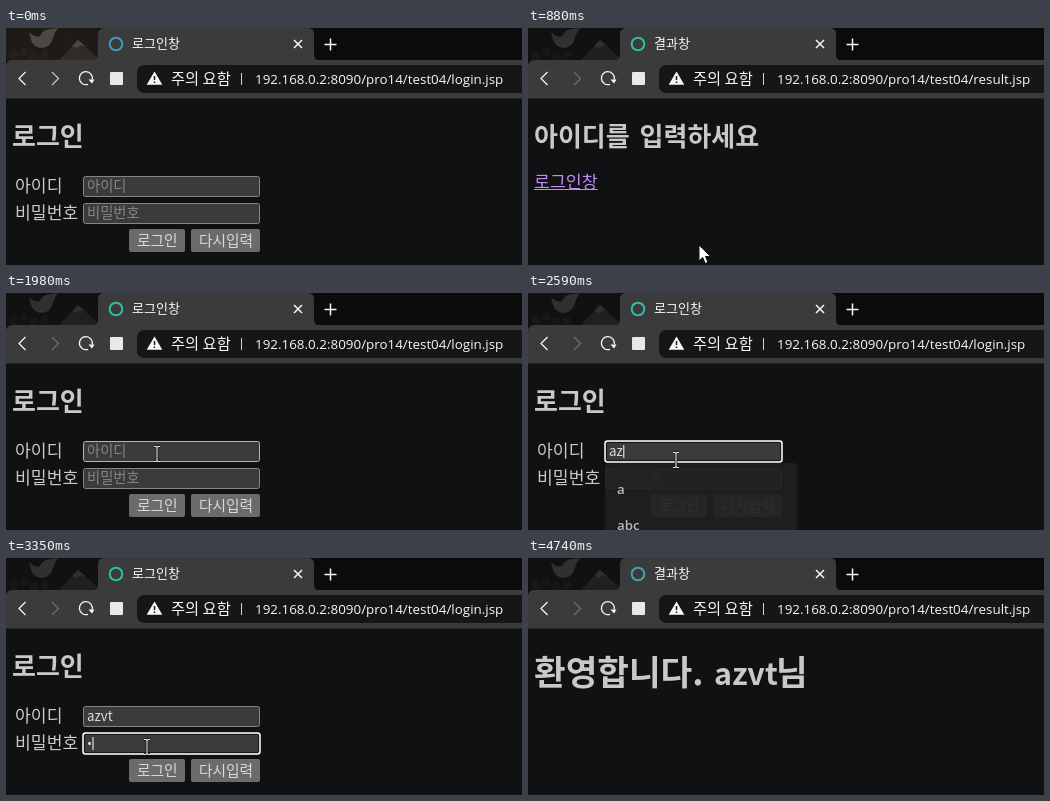
Recreate the animation shown at these times as an HTML page with a canvas. Size 516 px wide and 237 px high, loop 4.81 s.

```html
<!DOCTYPE html>
<html lang="ko">
<head>
<meta charset="utf-8">
<title>로그인창</title>
<style>
  html, body { margin: 0; width: 100%; height: 100%; overflow: hidden; background: #101112; }
  canvas { display: block; }
</style>
</head>
<body>
<canvas id="stage" width="516" height="237"></canvas>
<script>
const LOOP = 4810;
const ctx = document.getElementById('stage').getContext('2d');
const KOREAN = '"Noto Sans CJK KR", "Noto Sans CJK", sans-serif';
const LATIN = '"Open Sans", "Noto Sans", sans-serif';
const USER = 'azvt';

// Pointer moves: start, end, number of jumps, destination.
const MOVES = [
  [130, 410, 5, 171, 217],
  [1280, 1700, 7, 50, 154],
  [1840, 1980, 3, 151, 161],
  [2250, 2590, 4, 148, 167],
  [2810, 3060, 4, 141, 189],
  [3790, 3930, 3, 137, 208],
  [4600, 4740, 3, 220, 243]
];
const CLICKS = [610, 1700, 2250, 3210, 3930];
const USER_KEYS = [2500, 2590, 2680, 2730];
const PASSWORD_KEYS = [3350, 3410, 3490, 3580];

const between = (t, from, to) => t >= from && t < to;
const pressed = (t, keys) => keys.filter(key => t >= key).length;

function text(string, x, y, size, color, family = KOREAN, weight = 400) {
  ctx.font = `${weight} ${size}px ${family}`;
  ctx.fillStyle = color;
  ctx.fillText(string, x, y);
  return ctx.measureText(string).width;
}

function box(x, y, w, h, radius, fill, stroke, line = 1) {
  ctx.beginPath();
  ctx.roundRect(x, y, w, h, radius);
  if (fill) { ctx.fillStyle = fill; ctx.fill(); }
  if (stroke) { ctx.strokeStyle = stroke; ctx.lineWidth = line; ctx.stroke(); }
}

function shape(path, fill, stroke, line = 1.2) {
  const p = new Path2D(path);
  if (fill) { ctx.fillStyle = fill; ctx.fill(p); }
  if (stroke) { ctx.strokeStyle = stroke; ctx.lineWidth = line; ctx.stroke(p); }
}

function disc(x, y, r, fill) {
  ctx.beginPath();
  ctx.arc(x, y, r, 0, 7);
  ctx.fillStyle = fill;
  ctx.fill();
}

function drawTheme(bright) {
  box(0, 0, 516, 33, 0, '#0b0b0c');
  box(0, 0, 92, 33, 0, bright ? '#1d1a18' : '#111112');
  const tone = bright ? '#4d4842' : '#303031';
  [[8, 27, 5], [18, 24, 4], [28, 29, 5], [39, 27, 4], [60, 8, 1.5], [82, 6, 1.5]]
    .forEach(([x, y, r]) => disc(x, y, r, bright ? '#24201d' : '#171718'));
  shape('M52 33L72 12L92 30V33Z', bright ? '#2f2b27' : '#202021');
  shape('M66 18L72 12L80 19L75 17L71 20Z', tone);
  shape('M23 4Q29 10 34 8Q37 1 45 1L52 0Q48 5 47 10Q45 19 36 20Q28 20 25 12Z', tone);
}

function drawBrowser(title, page, ring, bright) {
  const toolbar = '#3b3b3b', white = '#f8f8f8';
  drawTheme(bright);
  shape('M86 33Q92 33 92 26V6Q92 0 98 0H302Q308 0 308 6V26Q308 33 314 33Z', toolbar);
  box(0, 32, 516, 38.5, [6, 0, 0, 0], toolbar);
  ctx.beginPath();
  ctx.arc(110, 16, 6.3, 0, 7);
  ctx.strokeStyle = ring;
  ctx.lineWidth = 2;
  ctx.stroke();
  text(title, 126, 20, 13, white, KOREAN, 500);
  shape('M288 12L296 20M296 12L288 20', null, white, 1.5);
  shape('M318.500 16.500H330.500M324.500 10.500V22.500', null, white, 1.5);

  shape('M19.500 44L13 50.500L19.500 57', null, white);
  shape('M46 44L52.500 50.500L46 57', null, bright ? '#c8c8c8' : '#707070');
  shape('M82 56.300A6.500 6.500 0 1 1 86.200 51.500', null, white, 1.3);
  shape('M82.500 51.500H88.500L86 55.500Z', white);
  box(104, 44, 13, 13, 1, '#e8e8e8');

  box(131, 37, 400, 28, 7, '#161617');
  shape('M148.500 45L155 56H142Z', white, white, 1.5);
  shape('M148.500 48V52M148.500 53.500V55', null, '#161617', 1.5);
  text('주의 요함', 165, 56, 15.3, white);
  box(235, 45, 1, 12, 0, '#d0d0d0');
  text(`192.168.0.2:8090/pro14/test04/${page}.jsp`, 249, 55.5, 13.4, white, LATIN, 500);
}

function drawField(y, label, value, font, focused, hovered) {
  text(label, 9, y + 16, 17.2, '#c9c9c9');
  if (focused) {
    box(77, y, 177, 21, 2.5, '#3b3b3b', '#ffffff', 1.5);
    box(78.5, y + 1.5, 174, 18, 1, null, '#161617');
  } else {
    box(77.5, y + .5, 176, 20, 2, '#3b3b3b', hovered ? '#b5b5b5' : '#858585');
  }
  let caret = 81.5;
  if (value) caret += text(value, 81, y + 15, 13.3, '#dddddd', font, 500);
  else text(label, 81, y + 15, 14.3, '#858585');
  if (focused) box(caret, y + 4, 1, 13, 0, '#ffffff');
}

function drawButton(x, width, label, fill) {
  box(x, 201, width, 23, 2, fill);
  text(label, x + 8, 217.5, 14.7, '#d8d8d8');
}

function drawSuggestions(t) {
  if (!between(t, 2330, 2680)) return;
  ctx.save();
  ctx.globalAlpha = t < 2410 ? .6 : t < 2590 ? 1 : .92;
  box(77, 170, 192, 80, 3, '#202021');
  text('a', 89, 201, 13.3, '#c8c8c8', LATIN, 600);
  text('abc', 89, 237, 13.3, '#c8c8c8', LATIN, 600);
  ctx.restore();
}

function drawHeading(string) {
  ctx.wordSpacing = '4px';
  text(string, 6, 117.5, 26, '#c9c9c9', KOREAN, 700);
  ctx.wordSpacing = '0px';
}

function drawLogin(t) {
  const user = USER.slice(0, pressed(t, USER_KEYS));
  const password = '•'.repeat(pressed(t, PASSWORD_KEYS));
  drawHeading('로그인');
  drawField(148, '아이디', user, KOREAN, between(t, 2250, 3210), between(t, 1980, 2250));
  drawField(175, '비밀번호', password, LATIN, between(t, 3210, 3930), between(t, 2970, 3210));
  drawButton(123, 56, '로그인', t >= 3930 ? '#5a5a5a' : '#6b6b6b');
  drawButton(185, 69, '다시입력', '#6b6b6b');
  drawSuggestions(t);
}

function drawMissingUser() {
  drawHeading('아이디를 입력하세요');
  const width = text('로그인창', 6, 160, 17.3, '#c58af9');
  box(6, 161, width, 1, 0, '#c58af9');
}

function drawWelcome() {
  const color = '#c9c9c9';
  text('환영합니다.', 6, 127, 34.4, color, KOREAN, 700);
  text(USER, 186, 127, 30.5, color, KOREAN, 700);
  text('님', 248, 127, 34.4, color, KOREAN, 700);
}

function pointerAt(t) {
  let x = 160, y = 243;
  for (const [start, end, steps, toX, toY] of MOVES) {
    if (t < start) break;
    const jumps = Math.floor((t - start) / (end - start) * (steps - 1) + 1e-6) + 1;
    const part = Math.min(1, jumps / steps);
    x += (toX - x) * part;
    y += (toY - y) * part;
  }
  return [x, y];
}

function drawPointer(t, onLogin) {
  const [x, y] = pointerAt(t);
  if (CLICKS.some(start => between(t, start, start + 140))) {
    disc(x - 1, y + 1, 12, 'rgba(196, 187, 42, .88)');
  }
  ctx.save();
  ctx.translate(x, y);
  if (onLogin && x > 77 && y < 197) {
    const beam = 'M-3 -7.500H-1L0 -6.500L1 -7.500H3M0 -6.500V6.500M-3 7.500H-1L0 6.500L1 7.500H3';
    shape(beam, null, '#111111', 2.6);
    shape(beam, null, '#e8e8e8', 1.1);
  } else if (!onLogin && t < 1840 && x < 71 && y < 164) {
    shape('M-1 0Q1 -2 2 0V6L8 8Q10 9 9 13L8 17H0L-5 10Q-5 7 -1 10Z', '#ffffff', '#111111', 1);
  } else {
    shape('M0 0V16L3.700 12.500L6.300 18.500L9 17.300L6.500 11.500H11.500Z', '#ffffff', '#111111', 1);
  }
  ctx.restore();
}

function draw(t) {
  const onLogin = t < 810 || between(t, 1840, 4070);
  box(0, 0, 516, 237, 0, '#101112');
  const ring = t < 810 ? '#3a9db8' : t < 4070 ? '#2fbfa5' : '#36a9ac';
  drawBrowser(onLogin ? '로그인창' : '결과창', onLogin ? 'login' : 'result', ring, t < 810);
  if (onLogin) drawLogin(t);
  else if (t < 1840) drawMissingUser();
  else drawWelcome();
  drawPointer(t, onLogin);
}

const began = performance.now();
function frame() {
  draw((performance.now() - began) % LOOP);
  requestAnimationFrame(frame);
}
frame();
</script>
</body>
</html>
```
